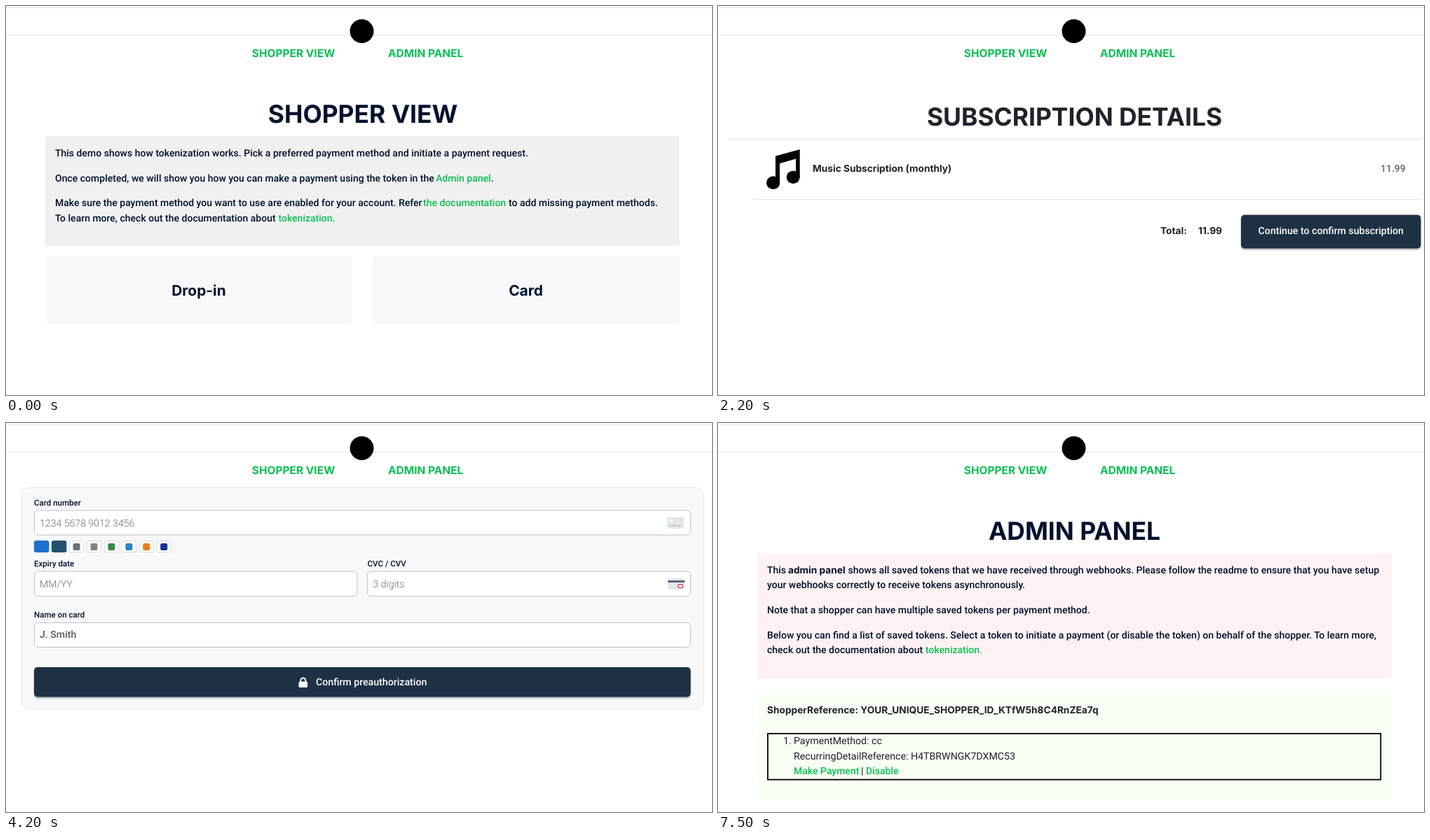
Recreate the animation shown at these times as an HTML page. Size 1007x556 px, loop 8 s.

```html
<!DOCTYPE html>
<html lang="en">
<head>
<meta charset="utf-8">
<title>Tokenization demo</title>
<style>
  html, body { margin: 0; width: 100%; height: 100%; overflow: hidden; background: #fff; }
  svg { display: block; width: 100%; height: 100%; }
  text {
    font: 450 14px Roboto, Arial, sans-serif;
    fill: #00112c;
    text-rendering: geometricPrecision;
    font-optical-sizing: none;
  }
  .h1, .h2, .nav, .bold { font-family: Inter, Arial, sans-serif; font-weight: 700; }
  .h1 { font-size: 35.4px; }
  .h2 { font-size: 20.9px; }
  .nav { font-size: 15.5px; }
  .bold { font-size: 13.7px; }
  .mid { text-anchor: middle; }
  .label { font-size: 11.55px; }
  .hint { font-size: 14.1px; font-weight: 300; fill: #666c75; }
  .typed { font-size: 14.15px; font-weight: 500; fill: #555c66; }
  .btn { font-size: 14.15px; font-weight: 500; fill: #fff; }
  .plain { font-weight: 400; font-size: 14.2px; }
  .dark { fill: #20222b; }
  .slate { fill: #56637a; }
  .green { fill: #0abf53; }
  .rule { stroke: #e2e2e2; }
  .tile { fill: #f7f8f9; }
  .field { fill: #fff; stroke: #b9c4c9; }
  .navy { fill: #1e3044; }
  .ink { fill: #00112c; stroke: none; }
  .brush { fill: none; stroke: #00112c; stroke-width: 6.5; stroke-linejoin: round; }
  filter { color-interpolation-filters: sRGB; }
  [data-from] { display: none; }
</style>
</head>
<body>
<svg viewBox="0 0 1007 556">
  <defs>
    <filter id="lift" x="-10%" y="-30%" width="120%" height="170%">
      <feDropShadow dx="0" dy="8" stdDeviation="6" flood-color="#00112c" flood-opacity=".06"/>
    </filter>
    <filter id="drop" x="-5%" y="-20%" width="110%" height="150%">
      <feDropShadow dx="0" dy="2" stdDeviation="1.2" flood-color="#1e3044" flood-opacity=".35"/>
    </filter>
    <g id="header">
      <path class="rule" d="M0 2.5H1007M0 41.5H1007"/>
      <circle cx="507.5" cy="36" r="17"/>
      <text class="nav green mid" x="410" y="73.3">SHOPPER VIEW</text>
      <text class="nav green mid" x="598.7" y="73.3">ADMIN PANEL</text>
    </g>
  </defs>

  <use href="#header" data-from="0" data-to="5000"/>
  <use href="#header" data-from="7500" data-to="8000"/>

  <!-- Shopper view -->
  <g data-from="0" data-to="1000">
    <text class="h1 mid" x="509" y="167">SHOPPER VIEW</text>
    <rect x="56" y="186" width="904.5" height="157" fill="#f0f0f0"/>
    <text x="70" y="215">This demo shows how tokenization works. Pick a preferred payment method and initiate a payment request.</text>
    <text x="70" y="250.5">Once completed, we will show you how you can make a payment using the token in the</text>
    <text class="green" x="613" y="250.5">Admin panel<tspan fill="#00112c">.</tspan></text>
    <text x="70" y="286">Make sure the payment method you want to use are enabled for your account. Refer</text>
    <text class="green" x="595" y="286">the documentation</text>
    <text x="717" y="286">to add missing payment methods.</text>
    <text x="70" y="307.5">To learn more, check out the documentation about</text>
    <text class="green" x="388.5" y="307.5">tokenization.</text>
    <rect class="tile" x="56" y="357.5" width="438" height="97.5" rx="4.5"/>
    <rect class="tile" x="523" y="357.5" width="438" height="97.5" rx="4.5"/>
    <rect class="tile" data-from="500" data-to="1000" x="523" y="358" width="437.5" height="97" rx="4.5" stroke="#3272f0" filter="url(#lift)"/>
    <text class="h2 mid" x="275" y="413.5">Drop-in</text>
    <text class="h2 mid" x="741.5" y="413.5">Card</text>
  </g>

  <!-- Subscription details -->
  <g data-from="1000" data-to="3000">
    <text class="h1 mid dark" x="508.5" y="171">SUBSCRIPTION DETAILS</text>
    <path class="rule" d="M14 190.5H1003M50 276.5H1003"/>
    <path d="M82 214.5L116.7 205V245H111V218.5L88 225V253H82Z"/>
    <ellipse cx="78.7" cy="252.7" rx="9.6" ry="9.4"/>
    <ellipse cx="107.2" cy="244.7" rx="9.5" ry="9.3"/>
    <text class="bold dark" x="135" y="237">Music Subscription (monthly)</text>
    <text class="slate" x="945" y="237">11.99</text>
    <text class="bold dark" x="631" y="326">Total:</text>
    <text class="bold dark" x="685" y="326">11.99</text>
    <rect class="navy" x="746" y="298.5" width="256.5" height="48" rx="5" filter="url(#drop)"/>
    <text class="btn mid" x="874.3" y="326.3">Continue to confirm subscription</text>
  </g>

  <!-- Card form -->
  <g data-from="3000" data-to="5000">
    <rect x="22" y="92.5" width="973" height="316" rx="10.5" fill="#f7f8f9" stroke="#e4e8ea"/>
    <text class="label" x="40" y="117.6">Card number</text>
    <rect class="field" x="40.5" y="125" width="936" height="35" rx="5"/>
    <text class="hint" x="48" y="148">1234 5678 9012 3456</text>
    <rect x="943" y="134.5" width="24" height="16.5" rx="2" fill="#e3e7ea"/>
    <rect x="946.5" y="138" width="4.5" height="3.5" rx="1" fill="#fff"/>
    <path d="M946.5 146.5H963.5" stroke="#b9c4c9" stroke-width="1.5"/>
    <g id="chips"></g>
    <text class="label" x="40" y="205">Expiry date</text>
    <text class="label" x="515.5" y="205">CVC / CVV</text>
    <rect class="field" x="40.5" y="212" width="460.5" height="35.5" rx="5"/>
    <rect class="field" x="515.5" y="212" width="461" height="35.5" rx="5"/>
    <text class="hint" x="48" y="235.3">MM/YY</text>
    <text class="hint" x="523.5" y="235.3">3 digits</text>
    <rect x="944" y="222" width="24" height="16" rx="2" fill="#e3e7ea"/>
    <path d="M944 226.5H968" stroke="#5c687c" stroke-width="3"/>
    <rect x="958.5" y="230.7" width="6.8" height="4.8" rx="2.3" fill="#fff" stroke="#d8304a" stroke-width="1.2"/>
    <text class="label" x="40" y="278">Name on card</text>
    <rect class="field" x="40.5" y="285.5" width="936" height="35" rx="5"/>
    <text class="typed" x="48" y="307">J. Smith</text>
    <rect class="navy" x="40" y="349" width="936.5" height="42.5" rx="5" filter="url(#drop)"/>
    <path d="M420.3 371V368a3.5 3.5 0 0 1 7 0V371" fill="none" stroke="#fff" stroke-width="2"/>
    <rect x="417.5" y="369.5" width="12.6" height="8.5" rx="1.5" fill="#fff"/>
    <text class="btn" x="442" y="374.5">Confirm preauthorization</text>
  </g>

  <!-- Confirmation -->
  <g data-from="5000" data-to="7500">
    <g fill="none" stroke="#0abf53" stroke-width="4">
      <circle cx="492.5" cy="191.5" r="42.5"/>
      <path d="M476 192.5L485.5 202.5L508.5 179.5" stroke-linecap="round"/>
    </g>
    <g class="brush" role="img" aria-label="Thank you!">
      <path stroke-width="10" d="M394 258L388.5 303" style="stroke-width:10"/>
      <path class="ink" d="M376 258L384 255.5L409 253.5L407 260L386 261.5L377 262Z"/>
      <path d="M414 251L406.5 301" style="stroke-width:8"/>
      <path d="M409 290Q417 274 422 277Q425 280 420.5 292Q419 302 425 299.5Q430 297 433 291"/>
      <path d="M449 279Q441 275 435.5 286Q431 299 437 299Q443 298 450 278Q445 293 446 297Q449 301 458 289"/>
      <path d="M463 277L457.5 301"/>
      <path d="M460 292Q469 275 473.5 278Q476 281 472 291Q470 300 475.5 298.5Q481 296 485 290"/>
      <path d="M498.5 262L491.5 304" style="stroke-width:8.5"/>
      <path d="M512 267Q506 279 496 284.5Q503 292 511 299"/>
      <path d="M528 278Q523.5 297 530 297Q537 295 545 277"/>
      <path d="M544 281Q538 300 534 339" style="stroke-width:8"/>
      <path d="M558 279.5Q550 279 549.5 291Q550 299 555 297.5Q562 293 562 283.5Q561 279 556 280"/>
      <path d="M571 277Q564 298 570 299Q576 298 584 277Q579 294 581 297.5Q585 300 592 290"/>
      <path class="ink" d="M602 256L609 254L602.5 291H598.5Z"/>
      <circle class="ink" cx="599.5" cy="300.5" r="3.8"/>
    </g>
    <text class="plain dark mid" x="492" y="361">Your subscription has been successfully confirmed.</text>
    <rect x="403" y="389.5" width="178.5" height="48" rx="5" fill="#00112c"/>
    <text class="btn mid" x="492.5" y="417.3">Return to Shopper View</text>
  </g>

  <!-- Admin panel -->
  <g data-from="7500" data-to="8000">
    <text class="h1 mid" x="508.5" y="167">ADMIN PANEL</text>
    <rect x="56" y="186" width="904.5" height="179" fill="#fff2f2"/>
    <text x="70" y="215">This</text>
    <text class="bold" x="100" y="215">admin panel</text>
    <text x="185.5" y="215">shows all saved tokens that we have received through webhooks. Please follow the readme to ensure that you have setup</text>
    <text x="70" y="236.3">your webhooks correctly to receive tokens asynchronously.</text>
    <text x="70" y="272">Note that a shopper can have multiple saved tokens per payment method.</text>
    <text x="70" y="307.5">Below you can find a list of saved tokens. Select a token to initiate a payment (or disable the token) on behalf of the shopper. To learn more,</text>
    <text x="70" y="329">check out the documentation about</text>
    <text class="green" x="296" y="329">tokenization.</text>
    <rect x="56" y="385.5" width="904.5" height="153.5" fill="#f8fff4"/>
    <text class="bold dark" x="70" y="414.7">ShopperReference: YOUR_UNIQUE_SHOPPER_ID_KTfW5h8C4RnZEa7q</text>
    <rect x="71" y="443.9" width="874.3" height="65.8" fill="none" stroke="#000" stroke-width="1.8"/>
    <text class="plain dark" x="93" y="459">1.</text>
    <text class="plain dark" x="108" y="459">PaymentMethod: cc</text>
    <text class="plain dark" x="108" y="480.5">RecurringDetailReference: H4TBRWNGK7DXMC53</text>
    <text class="green" x="108" y="501.7">Make Payment</text>
    <text class="dark" x="204" y="501.7">|</text>
    <text class="green" x="211" y="501.7">Disable</text>
  </g>
</svg>
<script>
  const LOOP = 8000;

  // Accepted-card chips: plain plates, the first two fully tinted
  const tints = ['#1f70cc', '#24506f', '#66707c', '#8a8178', '#3a8a4a', '#2b86c9', '#ee7a1c', '#1a2f9c'];
  const rect = (x, y, w, h, fill, stroke) =>
    `<rect x="${x}" y="${y}" width="${w}" height="${h}" rx="2" fill="${fill}" stroke="${stroke}"/>`;
  document.getElementById('chips').innerHTML = tints.map((tint, i) => {
    const x = 40.5 + i * 24.93;
    return i < 2
      ? rect(x, 168.5, 20.5, 16, tint, tint)
      : rect(x, 168.5, 20.5, 16, '#fff', '#d5dadd') + rect(x + 5.25, 172, 10, 10, tint, 'none');
  }).join('');

  const parts = [...document.querySelectorAll('[data-from]')].map(el => ({
    el, from: +el.dataset.from, to: +el.dataset.to
  }));

  const start = performance.now();
  function draw() {
    const t = (performance.now() - start) % LOOP;
    for (const { el, from, to } of parts) {
      el.style.display = t >= from && t < to ? 'inline' : 'none';
    }
    requestAnimationFrame(draw);
  }
  draw();
</script>
</body>
</html>
```
